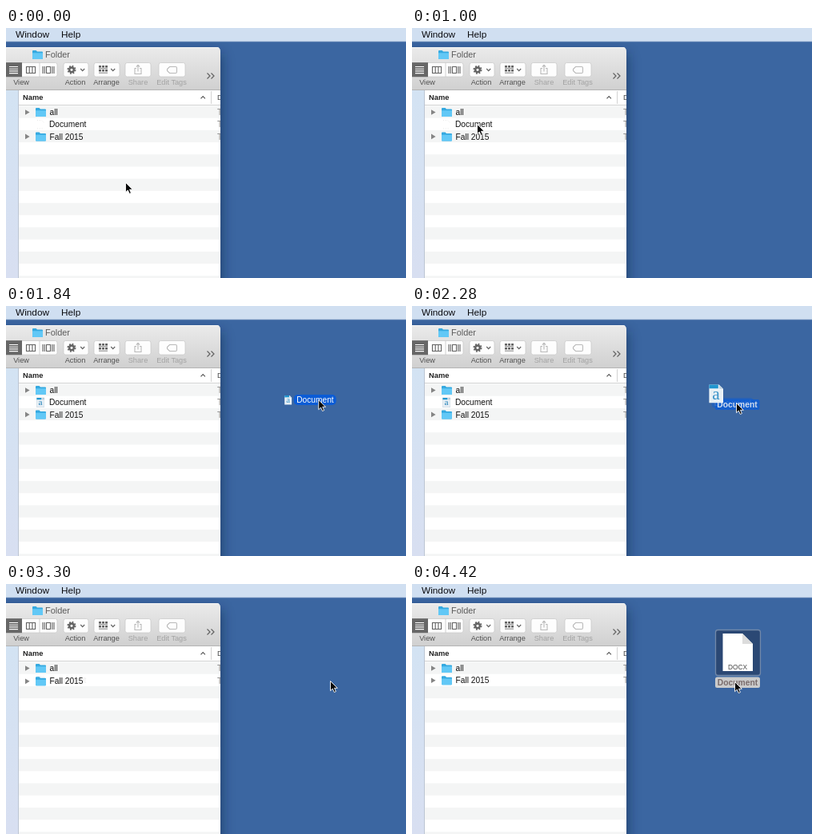
These frames come from a looping animation (500 by 313 pixels, 5420 ms). An HTML page:

```html
<!DOCTYPE html>
<html lang="en">
<head>
<meta charset="utf-8">
<title>Dragging a document to the desktop</title>
<style>
  html, body { margin: 0; width: 100%; height: 100%; overflow: hidden; background: #3b66a1; }
  svg { display: block; width: 100vw; height: 100vh; }
  text { font-family: "Liberation Sans", Arial, sans-serif; }
  .row { font-size: 10.2px; fill: #111; }
  .label { font-size: 10.3px; font-weight: bold; text-anchor: middle; }
  .tool { font-size: 9.2px; fill: #505050; text-anchor: middle; }
  .off { fill: #a2a2a2; }
  .serif { font-family: "Liberation Serif", "Times New Roman", serif; }
  .btn { fill: #fdfdfd; stroke: #c6c6c6; stroke-width: .7; }
  .line { fill: none; stroke: #626262; stroke-width: 1.1; }
  .pale { stroke: #b9b9b9; }
</style>
</head>
<body>
<svg viewBox="0 0 500 313" preserveAspectRatio="none">
  <defs>
    <linearGradient id="bar" x2="0" y2="1">
      <stop offset="0" stop-color="#ebebeb"/><stop offset="1" stop-color="#d0d0d0"/>
    </linearGradient>
    <linearGradient id="side" x2="0" y2="1">
      <stop offset="0" stop-color="#d3e3f3"/><stop offset="1" stop-color="#d8dff1"/>
    </linearGradient>
    <filter id="blur" x="-20%" y="-20%" width="140%" height="140%"><feGaussianBlur stdDeviation="8"/></filter>
    <clipPath id="win"><path d="M0 24H263Q268 24 268 29V313H0Z"/></clipPath>
    <g id="folder">
      <path d="M0 1Q0 0 1 0H4.6L6 1.5H12Q13 1.5 13 2.5V10Q13 11 12 11H1Q0 11 0 10Z" fill="#35a9e0"/>
      <path d="M0 3.3H13V10Q13 11 12 11H1Q0 11 0 10Z" fill="#62c8f6"/>
    </g>
    <path id="tri" d="M0 0L5.6 3.3L0 6.6Z" fill="#858585"/>
    <g id="page">
      <path d="M0 0H26L37 11V48H0Z" fill="#eef4f8"/>
      <path id="rules" d="M4 16H33M4 20H33M4 24H33M4 28H33M4 32H33M4 36H33M4 40H33M4 44H33" stroke="#cfdee8" stroke-width="1"/>
      <path d="M0 0H24V10H0Z" fill="#2196cf"/>
      <path d="M26 0V11H37Z" fill="#c3d4e0"/>
      <text class="serif" x="18" y="38" font-size="45" text-anchor="middle" fill="currentColor">a</text>
    </g>
  </defs>

  <rect width="500" height="313" fill="#3b66a1"/>
  <rect x="-40" y="32" width="309" height="330" fill="#0b1c38" opacity=".55" filter="url(#blur)"/>
  <rect width="500" height="17" fill="#d0dff1"/>
  <rect y="16.5" width="500" height=".8" fill="#9db4d2"/>
  <g font-size="11.8" fill="#0c0c10"><text x="12" y="12.3">Window</text><text x="69" y="12.3">Help</text></g>

  <g clip-path="url(#win)">
    <rect y="24" width="268" height="54" fill="url(#bar)"/>
    <rect y="24" width="268" height="1" fill="#f6f6f6"/>
    <use href="#folder" x="33" y="28"/>
    <text x="49" y="37.3" font-size="10.9" fill="#5c5c5c">Folder</text>

    <path class="btn" d="M0 43.5H61.5Q64 43.5 64 46V58.5Q64 61 61.5 61H0Z"/>
    <rect y="43.2" width="20" height="18" fill="#676767"/>
    <path d="M4 48.5H15M4 51.2H15M4 53.9H15M4 56.6H15" stroke="#fff" stroke-width="1.1"/>
    <path d="M42 43.5V61" stroke="#c6c6c6" stroke-width=".8"/>
    <path class="line" d="M25.5 48.5H36.5V56.5H25.5ZM29.2 48.5V56.5M32.9 48.5V56.5"/>
    <path class="line" d="M50.5 48.5H55.5V56.5H50.5ZM46 48V57M48.2 48V57M57.8 48V57M60 48V57"/>
    <g id="buttons"></g>
    <g fill="none" stroke="#626262">
      <circle cx="82" cy="52.3" r="2.8" stroke-width="2.4"/>
      <circle cx="82" cy="52.3" r="4.6" stroke-width="1.8" stroke-dasharray="1.9 1.71"/>
      <path d="M93.2 51L95.7 53.6L98.2 51M131.2 51L133.7 53.6L136.2 51" stroke-width="1.2"/>
      <path d="M116 48.2H127M116 53.2H127" stroke-width="2.6" stroke-dasharray="3 1"/>
      <path d="M116 50.7H127M116 56.2H127" stroke-width=".8"/>
      <path d="M251.5 56.5L255 60L251.5 63.5M256.5 56.5L260 60L256.5 63.5" stroke-width="1.2"/>
    </g>
    <path class="line pale" d="M163 50.5H161V57.5H169V50.5H167M165 54.5V46.5M162.8 48.6L165 46.4L167.2 48.6"/>
    <path class="line pale" d="M204.5 48.5H212Q213.5 48.5 213.5 50V55Q213.5 56.5 212 56.5H204.5L201.5 53.5V51.5Z"/>

    <rect y="77" width="268" height="236" fill="#fff"/>
    <rect y="77" width="16" height="236" fill="url(#side)"/>
    <rect x="15" y="77" width="1" height="236" fill="#bcc5d3"/>
    <rect y="77" width="268" height="1" fill="#b4b4b4"/>
    <g id="stripes" fill="#f4f5f5"></g>
    <rect x="16" y="96" width="252" height="1" fill="#d3d3d3"/>
    <text x="21" y="90.2" font-size="9.3" font-weight="bold" fill="#222">Name</text>
    <path d="M243.5 88.3L246.2 85.5L248.9 88.3" fill="none" stroke="#555" stroke-width="1.1"/>
    <rect x="256" y="79" width="1" height="16" fill="#d3d3d3"/>
    <text x="264" y="90.2" font-size="9.3" fill="#444">D</text>

    <g class="row">
      <use href="#tri" x="24" y="102.2"/><use href="#folder" x="37" y="100"/>
      <text x="54.5" y="109">all</text><text x="264" y="109" fill="#888">T</text>
      <g id="doc">
        <g id="blank" fill="none" stroke="#dedede" stroke-width=".7">
          <path d="M39 115.5H44.5L47.5 118.5M39 125.8H47.5" stroke-dasharray="1 1.8"/>
        </g>
        <g id="icon" color="#1f7eb5">
          <rect x="38" y="114.7" width="10" height="12" fill="#b5c8d4"/>
          <use href="#page" transform="translate(38.4 115) scale(.25 .236)"/>
        </g>
        <text x="54" y="124.4">Document</text><text x="264" y="124.4" fill="#888">T</text>
      </g>
      <g id="fall">
        <use href="#tri" x="24" y="132.6"/><use href="#folder" x="37" y="130.4"/>
        <text x="54.5" y="139.5">Fall 2015</text><text x="264" y="139.5" fill="#888">T</text>
      </g>
    </g>
  </g>

  <g id="ghost">
    <g id="pill">
      <rect x="50.5" y="114" width="53" height="13" rx="5" fill="#0b5cd6"/>
      <text x="54" y="124.2" font-size="10.2" fill="#fff">Document</text>
    </g>
    <g id="tag">
      <rect x="379" y="117" width="55.5" height="13" rx="2.5" fill="#0b5cd6"/>
      <text class="label" x="406.5" y="127.2" fill="#fff">Document</text>
    </g>
    <g id="art"><use href="#page"/></g>
    <g id="kind">
      <rect x="384.5" y="95" width="24" height="11" rx="4" fill="#e6f2fa" stroke="#8fc2e2" stroke-width=".8"/>
      <text x="396.5" y="103.2" font-size="7.2" font-weight="bold" text-anchor="middle" fill="#3b8fc4">DOCX</text>
    </g>
  </g>

  <g id="dropped">
    <rect x="379.5" y="57.5" width="56" height="57" rx="3" fill="#2b4874" stroke="#7188a9" stroke-width="1.3"/>
    <path d="M388.5 62H413L426 75V109H388.5Z" fill="#fff"/>
    <path d="M413 62V75H426Z" fill="#dcdcdc"/>
    <text x="407" y="107.4" font-size="8.3" text-anchor="middle" fill="#484848">DOCX</text>
    <rect x="379" y="116.5" width="56" height="13.5" rx="2.5" fill="#cbcbcb"/>
    <text class="label" x="407" y="127" fill="#7a6c6c">Document</text>
  </g>

  <path id="cursor" d="M0 0V12.2L2.8 9.6L4.8 14L6.9 13.1L5 8.8H8.8Z" fill="#080808" stroke="#fff" stroke-width=".9"/>
</svg>
<script>
const LOOP = 5420, STEP = 40, ROW = 15.2;
const $ = id => document.getElementById(id);
const lerp = (a, b, k) => a + (b - a) * k;
const ease = (t, from, to) => {
  const u = Math.min(1, Math.max(0, (t - from) / (to - from)));
  return u * u * (3 - 2 * u);
};
const fade = (id, v) => $(id).setAttribute('opacity', v);
const move = (id, x, y, s = 1) => $(id).setAttribute('transform', `translate(${x} ${y}) scale(${s})`);

// Eased value between [time, value] keys.
function track(keys, t) {
  let v = keys[0][1];
  for (let i = 1; i < keys.length; i++) {
    const [t0, v0] = keys[i - 1], [t1, v1] = keys[i];
    if (t >= t0) v = lerp(v0, v1, ease(t, t0, t1));
  }
  return v;
}

const pathX = [[80, 149.5], [820, 81.5], [1340, 81.5], [1914, 405.5], [4150, 405.5], [4400, 403.5]];
const pathY = [[80, 193.5], [820, 120.5], [1340, 120.5], [1560, 131], [1840, 117.5], [1980, 121.5], [4150, 121.5], [4400, 122.5]];

$('buttons').innerHTML = [
  ['', 72, 31], ['Arrange', 110, 32], ['Share', 149, 32], ['Edit Tags', 191, 33]
].map(([, x, w]) => `<rect class="btn" x="${x}" y="43.5" width="${w}" height="17.5" rx="2.5"/>`).join('') + [
  ['View', 19], ['Action', 86.5], ['Arrange', 125.5], ['Share', 165, 'off'], ['Edit Tags', 207, 'off']
].map(([name, x, state = '']) => `<text class="tool ${state}" x="${x}" y="71">${name}</text>`).join('');

for (let i = 0; i < 15; i += 2)
  $('stripes').innerHTML += `<rect x="16" y="${97.5 + i * ROW}" width="252" height="${ROW}"/>`;

function draw(t) {
  const x = track(pathX, t), y = track(pathY, t);
  move('cursor', x, y);

  const known = t >= 1320 ? 1 : 0;
  fade('icon', known);
  fade('blank', 1 - known);
  const gone = ease(t, 3180, 3300);
  fade('doc', 1 - gone);
  move('fall', 0, -ROW * gone);

  // The list-style drag image grows into a desktop icon.
  const grow = ease(t, 2180, 2446);
  const dx = x - 81.5, dy = y - 120.5;
  fade('ghost', t < 1340 ? 0 : 1 - ease(t, 3120, 3280));
  fade('pill', Math.max(0, 1 - grow * 1.8));
  move('pill', dx, dy);
  fade('tag', Math.min(1, grow * 2.4));
  move('art', lerp(39 + dx, 389.5, grow), lerp(115 + dy, 61, grow), lerp(.24, .98, grow));
  $('art').setAttribute('color', grow < .8 ? '#3792c9' : '#69b2df');
  fade('kind', ease(grow, .6, 1));

  fade('dropped', ease(t, 4110, 4360));
}

const start = performance.now();
function tick() {
  const t = (performance.now() - start) % LOOP;
  draw(Math.floor(t / STEP) * STEP);
  requestAnimationFrame(tick);
}
draw(0);
tick();
</script>
</body>
</html>
```
